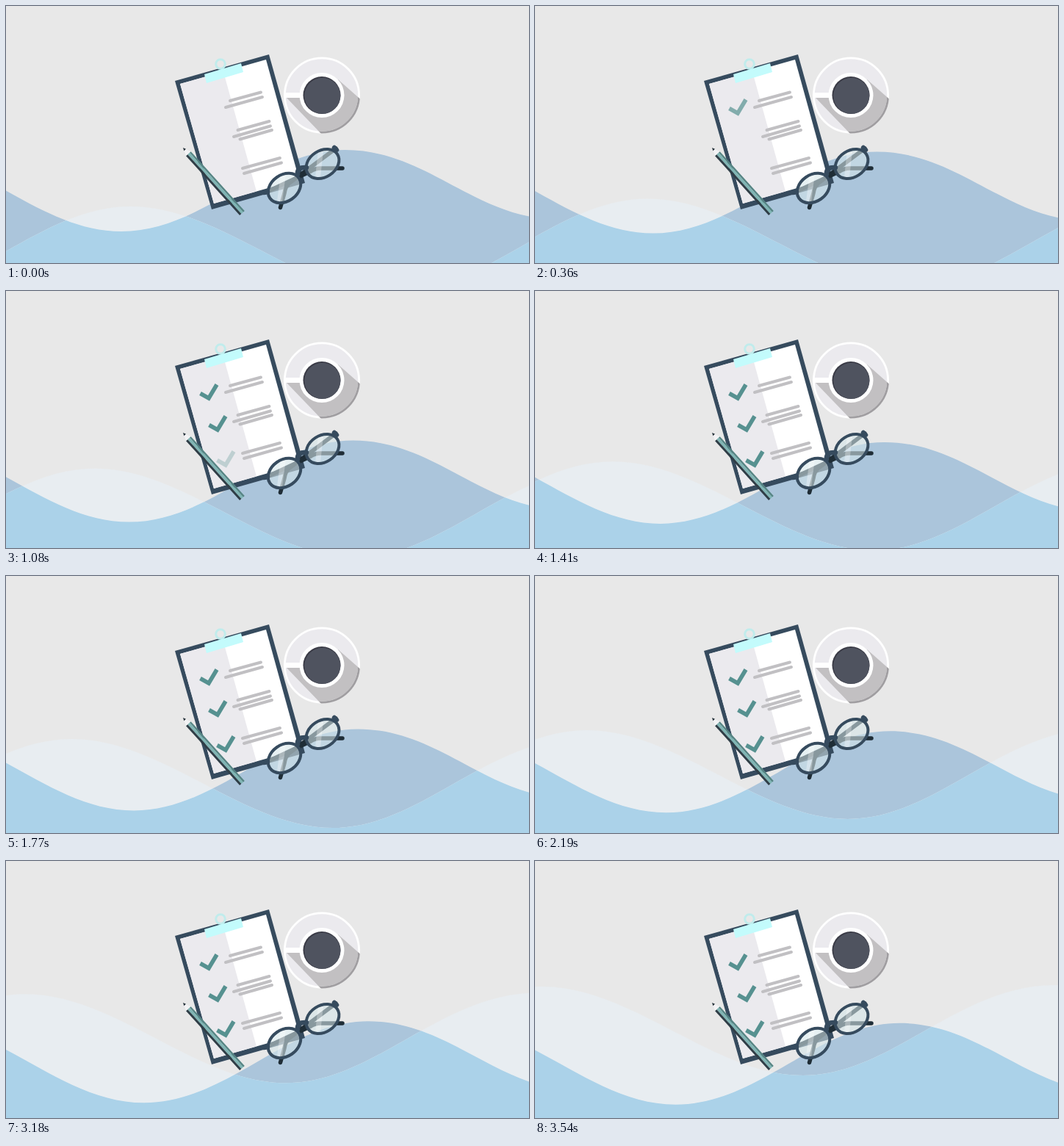
An HTML page for the animation above (3.6 s loop, 712x350 px).

```html
<!DOCTYPE html>
<html lang="en">
<head>
<meta charset="utf-8">
<title>Checklist on a desk</title>
<style>
  html, body { margin: 0; height: 100%; overflow: hidden; background: #e8e8e8; }
  svg { display: block; }
</style>
</head>
<body>
<svg width="712" height="350" viewBox="0 0 712 350">
  <defs>
    <path id="back" d="M-157 196C-43 196 43 307 157 307S351 196 462 196S640 290 748 290V400H-157Z"/>
    <path id="front" d="M-168 394C-45 394 47 273 170 273S404 394 525 394S736 271 868 271H900V520H-168Z"/>
    <path id="check" d="M264.500 139.500L276 146L287 127.500"/>
    <clipPath id="inBack"><use class="back" href="#back"/></clipPath>
    <clipPath id="inSaucer"><circle cx="430" cy="121.500" r="52"/></clipPath>
    <clipPath id="inShadow"><path id="shadow" d="M382 125L431 176H486V130L452 100Z"/></clipPath>
    <clipPath id="inLenses">
      <ellipse cx="379" cy="248" rx="24" ry="18" transform="rotate(-35 379 248)"/>
      <ellipse cx="431" cy="215" rx="24" ry="18" transform="rotate(-33 431 215)"/>
    </clipPath>
  </defs>

  <rect width="712" height="350" fill="#e8e8e8"/>
  <use class="back" href="#back" fill="#abc5db"/>
  <use class="front" href="#front" fill="#e8edf1"/>
  <g clip-path="url(#inBack)"><use class="front" href="#front" fill="#abd2e9"/></g>

  <!-- coffee -->
  <circle cx="430" cy="121.500" r="50.500" fill="#ebeaee"/>
  <use href="#shadow" fill="#c2c0c2" clip-path="url(#inSaucer)"/>
  <g fill="none" stroke-width="2.800">
    <circle cx="430" cy="121.500" r="50.600" stroke="#fff"/>
    <circle cx="430" cy="121.500" r="50.600" stroke="#a09ea1" clip-path="url(#inShadow)"/>
  </g>
  <path d="M380 118H405V125H380Z" fill="#fff"/>
  <circle cx="430" cy="121.500" r="30.500" fill="#fff"/>
  <circle cx="430" cy="121.500" r="25.500" fill="#3a3b46"/>
  <circle cx="430.800" cy="122.300" r="24.500" fill="#4f535f"/>

  <!-- clipboard -->
  <path d="M230 102L358 66L407 241L280 277Z" fill="#364b5e"/>
  <path d="M237 106L354 73L399 236L283 269Z" fill="#fff"/>
  <path d="M237 106L296 89.500L341 252.500L283 269Z" fill="#ebeaee"/>
  <circle cx="292" cy="79" r="6.300" fill="none" stroke="#c0ecec" stroke-width="3"/>
  <path d="M270 93L320 78L323 90L273 105Z" fill="#c3fbfc"/>
  <path d="M305 129L347 117.500M299 138L349 124M315.500 169L358.500 157M310 178L360 163.500M318.500 181.500L362 169M322 221L373 207M324 228L375 213.500"
    stroke="#c1c0c3" stroke-width="4" stroke-linecap="round"/>
  <g id="checks" fill="none" stroke="#569190" stroke-width="5.600">
    <use href="#check"/>
    <use href="#check" x="12" y="43"/>
    <use href="#check" x="23" y="91"/>
  </g>

  <!-- pencil -->
  <g transform="translate(241 193) rotate(47.900)">
    <path d="M0 0L12 -4.500V4.500Z" fill="#f3f3f5"/>
    <path d="M0 0L4 -1.800V1.800Z" fill="#26323a"/>
    <path d="M11 -4.500H120V-2H11Z" fill="#568584"/>
    <path d="M11 -2H120V1.500H11Z" fill="#7fb5b4"/>
    <path d="M11 1.500H120V4.500H11Z" fill="#2f3e47"/>
  </g>

  <!-- glasses -->
  <g fill="none" stroke-linecap="round">
    <path d="M449 194L386 241Q380 246 379 255L373.500 274.500M353 254L415 225Q421 221 428 221H458" stroke="#1f2d36" stroke-width="5.500"/>
    <g clip-path="url(#inLenses)">
      <path d="M340 180H470V280H340Z" fill="#d5e6e8" fill-opacity=".58"/>
      <path d="M378 225L372 270M429 192L424 238" stroke="#fff" stroke-opacity=".3" stroke-width="7"/>
    </g>
    <g stroke="#364b5e" stroke-width="4">
      <ellipse cx="379" cy="248" rx="24" ry="18" transform="rotate(-35 379 248)"/>
      <ellipse cx="431" cy="215" rx="24" ry="18" transform="rotate(-33 431 215)"/>
      <path d="M397 229Q396 219 409 220M447 193L450 196M351 254L356 253" stroke-width="6.500"/>
    </g>
  </g>
</svg>
<script>
const LOOP = 3600, FADE = 300, FIRST_CHECK = 150, CHECK_GAP = 420;
const checks = [...document.querySelectorAll('#checks use')];
const clamp = v => Math.min(1, Math.max(0, v));

function shift(name, dx, dy) {
  for (const el of document.querySelectorAll('.' + name))
    el.setAttribute('transform', `translate(${dx} ${dy})`);
}

function draw() {
  const time = performance.now() % LOOP, p = time / LOOP;
  shift('back', 35 * p, 25.2 * p);
  shift('front', -163 * p, -103.7 * p);
  checks.forEach((el, i) => {
    el.style.opacity = clamp((time - FIRST_CHECK - i * CHECK_GAP) / FADE);
  });
  requestAnimationFrame(draw);
}
draw();
</script>
</body>
</html>
```
